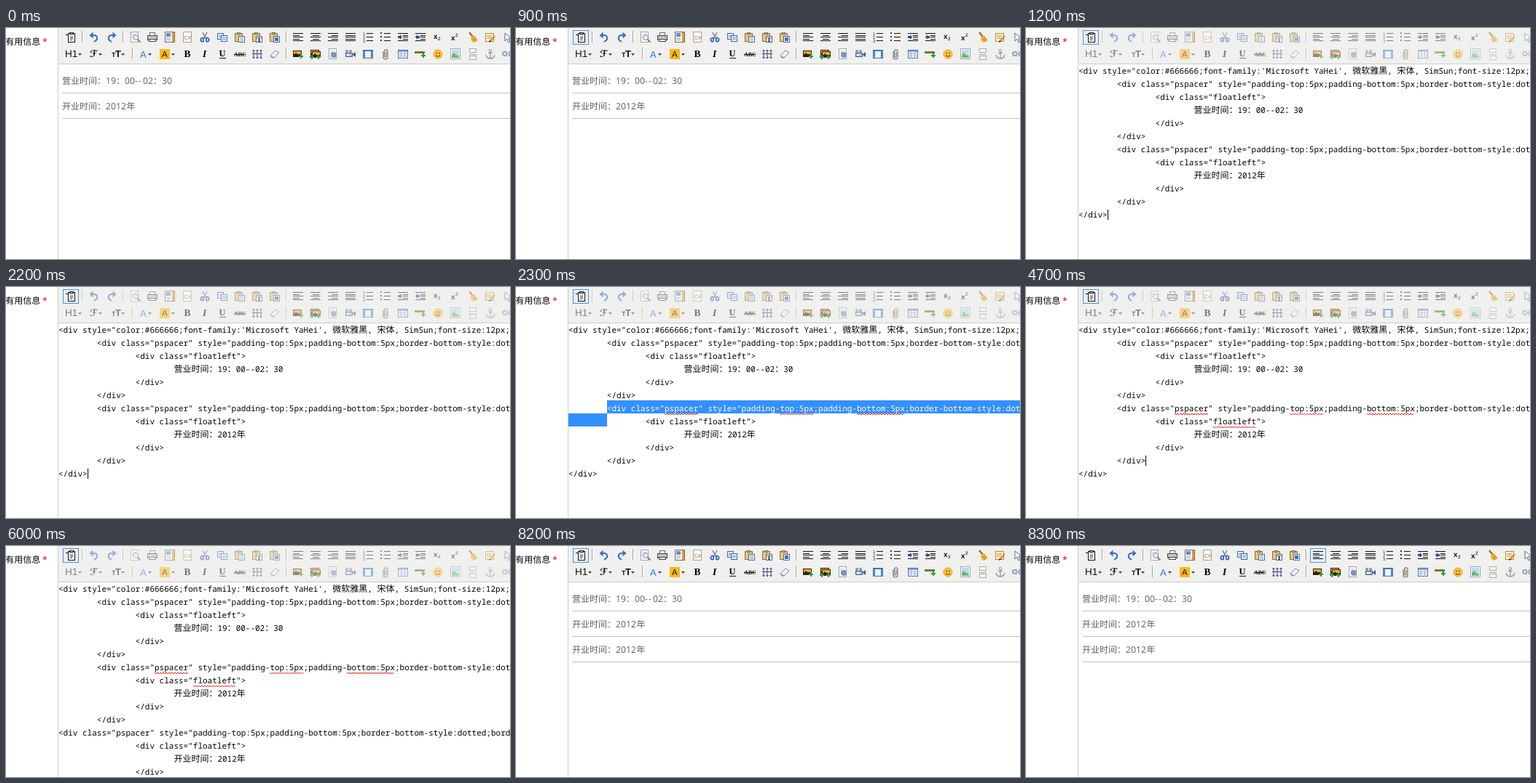
An HTML page for the animation above (9.6 s loop, 692x318 px).

```html
<!DOCTYPE html>
<html lang="zh-CN">
<head>
<meta charset="utf-8">
<title>Editor source view</title>
<style>
html, body { margin: 0; width: 100%; height: 100%; overflow: hidden; background: #fff; }
svg { display: block; }
text { text-rendering: geometricPrecision; }
.cjk { font: 12px "Noto Sans CJK SC", "Noto Sans CJK", sans-serif; }
.code { font: 11px "Noto Sans Mono", monospace; }
.num { font: 12.2px "Open Sans", sans-serif; }
.sans { font-family: "Liberation Sans", sans-serif; }
.bold { font-family: "Liberation Sans", sans-serif; font-weight: bold; }
.serif { font-family: "Liberation Serif", serif; font-weight: bold; }
rect, .crisp { shape-rendering: crispEdges; }
</style>
</head>
<body>
<svg id="stage" width="692" height="318" viewBox="0 0 692 318"></svg>
<script>
const INK = '#111', BLUE = '#3a6fc4', ON = '#5690d2';

// ---- shape helpers ----
const r = (x, y, w, h, f = INK) => `<rect x="${x}" y="${y}" width="${w}" height="${h}" fill="${f}"/>`;
const box = (x, y, w, h, f = '#fff', c = '#7489ab') =>
  `<rect x="${x + .5}" y="${y + .5}" width="${w - 1}" height="${h - 1}" fill="${f}" stroke="${c}"/>`;
const p = (d, f = INK) => `<path d="${d}" fill="${f}"/>`;
const s = (d, c = INK, w = 1) => `<path d="${d}" fill="none" stroke="${c}" stroke-width="${w}"/>`;
const dot = (x, y, q, f, c = 'none') => `<circle cx="${x}" cy="${y}" r="${q}" fill="${f}" stroke="${c}"/>`;
const t = (x, y, size, str, f = INK, cls = 'sans', more = '') =>
  `<text x="${x}" y="${y}" font-size="${size}" fill="${f}" class="${cls}" ${more}>${str}</text>`;
const drop = x => p(`M${x} 7h5l-2.5 3z`, '#444');

// ---- icon helpers, 16 x 16 each ----
const LINES = [2, 5, 7, 10, 12];
const align = pick => LINES.map((y, i) => {
  const w = i % 2 ? 9 : 14;
  return r(1 + Math.round((14 - w) * pick), y, w, 1);
}).join('');
const list = mark => [2, 7, 12].map((y, i) => r(6, y, 9, 1) + mark(y, i)).join('');
const indent = arrow => r(1, 2, 14, 1) + r(8, 5, 7, 1) + r(8, 7, 7, 1) + r(8, 10, 7, 1) + r(1, 12, 14, 1) + p(arrow, '#1f4fa8');
const clip = box(1, 2, 11, 12, '#e8c877', '#8f6f2c') + box(4, 1, 5, 3, '#ccc', '#666') + box(6, 6, 9, 9, '#fff', '#4c66a0');
const sheet = box(2, 0, 11, 15, '#fff', '#9aa6b8') + [3, 5, 7].map(y => r(4, y, 6, 1, '#c3cddc')).join('');
const photo = (x, y) => r(x, y, 12, 9, '#2c2415') + r(x + 1, y + 1, 10, 4, '#f0a63a') + p(`M${x + 1} ${y + 7}l3-4 3 3 2-1 2 2z`, '#2c2415');
const add = (x, y) => r(x + 2, y, 2, 6, '#2f9a2f') + r(x, y + 2, 6, 2, '#2f9a2f');
const turn = s('M4 5H9a4 4 0 0 1 1 7.5L8 14', BLUE, 2) + p('M6.5 .5v9L1.5 5z', BLUE);
const film = r(1, 2, 14, 12, '#3d78b8') + r(4, 4, 8, 9, '#eaf4ff') +
  [5, 8, 11].map(y => r(2, y, 1, 1, '#cfe3fa') + r(13, y, 1, 1, '#cfe3fa')).join('');
const grid = box(1, 2, 14, 12, '#fff', '#4c69a8') + r(2, 3, 12, 2, '#86a7dd') +
  [7, 10].map(y => r(1, y, 14, 1, '#9db0d8')).join('') + [5, 10].map(x => r(x, 5, 1, 9, '#9db0d8')).join('');
const spread = [3, 8, 13].map(x => s(`M${x} 2v12M${x - 1.5} 4l1.5-2 1.5 2M${x - 1.5} 12l1.5 2 1.5-2`, '#35457a')).join('') + r(1, 7, 14, 1, '#35457a');

const SOURCE = box(4, 2, 10, 13, '#fff', INK) + box(6, 1, 6, 3, '#ddd', INK) + s('M7 7.5h4M7 9.5h4M7 11.5h3', '#444') + p('M1 4h4v3H4V5H1z');

const ROW1 = [
  [121, turn],
  [145, `<g transform="matrix(-1 0 0 1 16 0)">${turn}</g>`],
  [177, sheet + dot(9, 8, 3.5, '#e2eef8', '#8390a0') + s('M11.5 10.5l4 4', '#9a7a52', 2)],
  [201, box(4, 1, 8, 5, '#fff', '#666') + box(1, 5, 14, 7, '#c4c4c4', '#444') + box(3, 10, 10, 4, '#fff', '#444') + r(11, 7, 2, 1, '#d8a23b')],
  [225, box(1, 0, 14, 15, '#f6f9ff', '#7a6a50') + r(11, 1, 3, 13, '#e59a2e') + r(3, 2, 6, 5, '#5b8fd0') + [9, 11].map(y => r(3, y, 6, 1, '#9aabc4')).join('')],
  [249, box(2, 0, 12, 15, '#fff', '#a89f94') + t(3.5, 11, 7.5, 'C#', '#a06a20')],
  [273, s('M5 1l4.5 9M11 1L6.5 10', '#6c7f9c', 1.4) + s('M6 9a2.2 2.7 0 1 0 .2 4zM10 9a2.2 2.7 0 1 1-.2 4z', '#2559b8', 1.6)],
  [297, [[1, 2], [6, 5]].map(([x, y]) => box(x, y, 9, 9, '#e4eeff', '#3f66b0') + r(x + 2, y + 3, 5, 1, '#7f9bd0') + r(x + 2, y + 5, 5, 1, '#7f9bd0')).join('')],
  [321, clip + [8, 10, 12].map(y => r(8, y, 5, 1, '#7f9bd0')).join('')],
  [345, clip + t(7.5, 14, 9, 'T', INK, 'serif')],
  [369, clip + r(8, 8, 5, 5, BLUE)],
  [401, align(0)], [425, align(.5)], [449, align(1)],
  [473, LINES.map(y => r(1, y, 14, 1)).join('')],
  [497, list((y, i) => t(1, y + 3, 6, i + 1, '#333'))],
  [521, list(y => r(1, y - 1, 2, 2, '#333'))],
  [545, indent('M1 6h3V4l3 3.5L4 11V9H1z')],
  [569, indent('M7 6H4V4L1 7.5 4 11V9h3z')],
  [593, t(2, 10, 10, 'x', INK, 'bold') + t(8, 12, 6.5, '2', '#224a9a', 'bold')],
  [617, t(2, 12, 10, 'x', INK, 'bold') + t(8, 7, 6.5, '2', '#224a9a', 'bold')],
  [641, s('M3 1l5 6', '#a35a1c', 2) + p('M5 8l5-3 5 7-6 3c-3-1-4-4-4-7z', '#f0b53c') + s('M8 9l3 5M10 8l3 4', '#b8761c')],
  [665, box(1, 2, 12, 12, '#fff4d4', '#c28a3d') + [5, 7, 9].map(y => r(3, y, 7, 1, '#c7a36a')).join('') + s('M14 6l-6 7', '#e0872b', 2.4) + p('M7 12l2 1.5L6 15z')],
  [689, p('M4 2v11l3-3 2 5 2-1-2-5h4z', '#fff') + s('M4 2v11l3-3 2 5 2-1-2-5h4z', '#4f6d9c')]
];

const ROW2 = [
  [89, t(0, 12, 13.5, 'H1') + drop(18)],
  [123, `<text x="0" y="12" font-size="13" font-weight="bold" font-family="DejaVu Sans, serif" fill="${INK}">ℱ</text>` + drop(12)],
  [152, t(1, 12, 9, 'T', INK, 'bold') + t(6, 12, 13, 'T', INK, 'bold') + drop(14)],
  [191, t(1, 12.5, 13, 'A', '#2f72d8') + drop(12)],
  [218, r(1, 1, 14, 14, '#fcb814') + t(4, 12, 11.5, 'A') + drop(17)],
  [249, t(3.5, 12, 13.5, 'B', '#000', 'serif')],
  [273, t(5, 12, 13.5, 'I', '#000', 'serif', 'font-style="italic"')],
  [297, t(3.5, 11, 12.5, 'U', '#000', 'serif') + r(4, 13, 9, 1)],
  [321, t(0, 11, 8, 'ABC', INK, 'serif') + r(0, 8, 16, 1)],
  [345, spread],
  [369, p('M2 10l7-7 5 3-7 7H4z', '#f4f6ff') + s('M2 10l7-7 5 3-7 7H4zM2 10l5 3', '#7080b5')],
  [401, photo(1, 3) + add(9, 8)],
  [425, photo(1, 2) + photo(3, 4) + add(0, 9) + add(9, 9)],
  [449, sheet + dot(9, 9, 4, '#7b93ad')],
  [473, box(1, 6, 10, 6, '#a9bdd6', '#4a617f') + p('M11 8l4-3v7l-4-3z', '#4a617f') + dot(3, 4, 2, '#7d94b3') + dot(8, 4, 2, '#7d94b3') + r(3, 8, 4, 2, '#e8f1fb')],
  [497, film],
  [521, s('M5 4v8a3 3 0 0 0 6 0V4a2.2 2.2 0 0 0-4.4 0v7a1 1 0 0 0 2.4 0V5', '#777', 1.2)],
  [545, grid],
  [569, r(0, 4, 14, 3, '#4f7f2c') + r(0, 4, 14, 1, '#a5793f') + add(9, 7)],
  [593, dot(8, 8, 6, '#ffc83a', '#e39a25') + dot(6, 6.5, 1, '#6b4a10') + dot(10, 6.5, 1, '#6b4a10') + s('M5 9.5q3 3.5 6 0', '#7d4b10', 1.2)],
  [617, box(1, 0, 14, 15, '#fff', '#9aa5ad') + r(3, 2, 10, 11, '#b9dcf2') + p('M3 13V9l3-3 4 4 1-1 2 2v2z', '#76b56a')],
  [641, box(3, 0, 10, 6, '#f8f8f8', '#aaa') + box(3, 10, 10, 6, '#f8f8f8', '#aaa') + s('M3 8.5h10', '#aaa')],
  [665, dot(8, 3, 1.7, 'none', '#929ba6') + s('M8 5v9M5 6.5h6M2 9q1 5 6 5 5 0 6-5', '#929ba6', 1.3)],
  [689, s('M7 10H3.5a2.5 2.5 0 0 1 0-5H7M9 5h4a2.5 2.5 0 0 1 0 5H9M5 7.5h6', '#6c8fbc', 1.4)]
];

const place = (x, y, body) => `<g transform="translate(${x - 8} ${y})">${body}</g>`;
const row = (icons, y, seps) => icons.map(([x, b]) => place(x, y, b)).join('') +
  seps.map(x => r(x, y - 1, 1, 16, '#a0a0a0') + r(x + 1, y - 1, 1, 16, '#fff')).join('');
const tools = row(ROW1, 5, [104, 160, 384]) + row(ROW2, 28, [173, 384]);

// ---- preview text ----
const OPEN = '营业时间：', SINCE = '开业时间：';
const rich = (y, parts) => parts.map(([x, str, sp]) =>
  t(x, y, 12, str, '#5c5c5c', /[^ -~]/.test(str) ? 'cjk' : 'num', sp ? `letter-spacing="${sp}"` : '')).join('') +
  `<path class="crisp" d="M78 ${y + 12.5}H692" stroke="#808080" stroke-dasharray="1 1"/>`;
const preview = rows => rich(77, [[77, OPEN], [137, '19'], [151, '：'], [163, '00'], [177, '--', 1.2], [188, '02'], [202, '：'], [214, '30']]) +
  Array.from({ length: rows }, (_, i) => rich(112 + 35 * i, [[77, SINCE], [137, '2012'], [165.5, '年']])).join('');

// ---- source text: [tabs, text] ----
const CH = 6.6, LEFT = 72;
const col = n => LEFT + n * CH;
const STYLE = '<div class="pspacer" style="padding-top:5px;padding-bottom:5px;border-bottom-style:dotted;border-bottom-width:1px;">';
const item = str => [[1, STYLE], [2, '<div class="floatleft">'], [3, str], [2, '</div>'], [1, '</div>']];
const END = [0, '</div>'];
const BASE = [
  [0, `<div style="color:#666666;font-family:'Microsoft YaHei', 微软雅黑, 宋体, SimSun;font-size:12px;line-height:18px;">`],
  ...item(OPEN + '19：00--02：30'), ...item(SINCE + '2012年')
];
const DOCS = {
  base: [...BASE, END],
  split: [...BASE, [0, ''], END],
  pasted: [...BASE, [0, STYLE], ...item(SINCE + '2012年').slice(1, 4)]
};
const mark = str => str.replace(/</g, '&lt;').replace(/[\u3000-\u9fff\uff00-\uffef]+/g, m => `<tspan class="cjk">${m}</tspan>`);
const source = (doc, fill) => DOCS[doc].map(([tabs, str], i) =>
  t(col(tabs * 8), 63 + 18 * i, 11, mark(str), fill, 'code')).join('');

// selected span of each line, from line 6 on
const SPANS = [[col(8), 692], [LEFT, col(40)], [LEFT, 329], [LEFT, col(23)], [LEFT, col(14)]];
const selection = (doc, spans) => {
  const rects = spans.map(([a, b], i) => r(a, 156 + 18 * i, b - a, 18, '#3390ff')).join('');
  return `<clipPath id="sel">${rects}</clipPath>${rects}<g clip-path="url(#sel)">${source(doc, '#fff')}</g>`;
};
const wave = (line, from, len) => {
  let d = `M${col(from)} ${66 + 18 * line}`;
  for (let i = 0; i < len * CH / 2 - 1; i++) d += `l2 ${i % 2 ? -2 : 2}`;
  return s(d, '#f00', .9);
};
const WAVES = [wave(6, 20, 7) + wave(6, 44, 7) + wave(6, 60, 10), wave(7, 28, 9)];

// ---- steps ----
const button = (x, y = 3, w = 22) => box(x, y, w, 20, '#e9eff6', ON);
const SRC = button(78);
const rte = (at, rows, on = '') => ({ at, on, body: preview(rows), dim: 1 });
const code = (at, doc, { waves = 0, sel = 0, caret = '' } = {}) => ({
  at, on: SRC, dim: .5,
  body: source(doc, '#000') + (sel ? selection(doc, sel) : '') + WAVES.slice(0, waves).join('') + caret
});
const caret = (x, y) => r(x, y, 1, 14, '#000');

const STEPS = [
  rte(0, 1),
  rte(200, 1, button(358, 26)),
  rte(300, 1, button(262, 26)),
  rte(400, 1, button(140, 26, 29)),
  rte(600, 1),
  rte(900, 1, SRC),
  code(1200, 'base', { caret: caret(112, 250) }),
  code(1700, 'base'),
  code(2200, 'base', { caret: caret(112, 250) }),
  code(2300, 'base', { waves: 1, sel: [SPANS[0], [LEFT, col(8)]] }),
  code(2400, 'base', { waves: 2, sel: [...SPANS.slice(0, 2), [LEFT, col(16)]] }),
  code(2500, 'base', { waves: 2, sel: SPANS.slice(0, 3) }),
  code(2800, 'base', { waves: 2, sel: SPANS }),
  code(4700, 'base', { waves: 2, caret: caret(164, 232) }),
  code(5200, 'base', { waves: 2 }),
  code(5600, 'split', { waves: 2, caret: caret(72, 250) }),
  code(6000, 'pasted', { waves: 2 }),
  rte(8200, 2, SRC),
  rte(8300, 2, button(390))
];
const LOOP = 9600;

const stage = document.getElementById('stage');
stage.innerHTML = r(0, 0, 692, 318, '#fff') + r(71, 0, 1, 318, '#ccc') + r(72, 0, 620, 49, '#f0f0ee') + r(72, 49, 620, 1, '#ccc') +
  t(-.7, 22.5, 12, '有用信息', '#000', 'cjk') + t(50, 23, 12, '*', '#e00000', 'num') +
  `<g id="on"></g><g id="tools">${tools}</g>${place(89, 5, SOURCE)}<g id="body"></g>`;
const [on, bar, body] = ['on', 'tools', 'body'].map(id => document.getElementById(id));

let shown, start;
function show(time) {
  const step = STEPS.filter(q => q.at <= time).pop();
  if (step === shown) return;
  shown = step;
  on.innerHTML = step.on;
  bar.setAttribute('opacity', step.dim);
  body.innerHTML = step.body;
}
function tick(now) {
  start ??= now;
  show((now - start) % LOOP);
  requestAnimationFrame(tick);
}
show(0);
requestAnimationFrame(tick);
</script>
</body>
</html>
```
